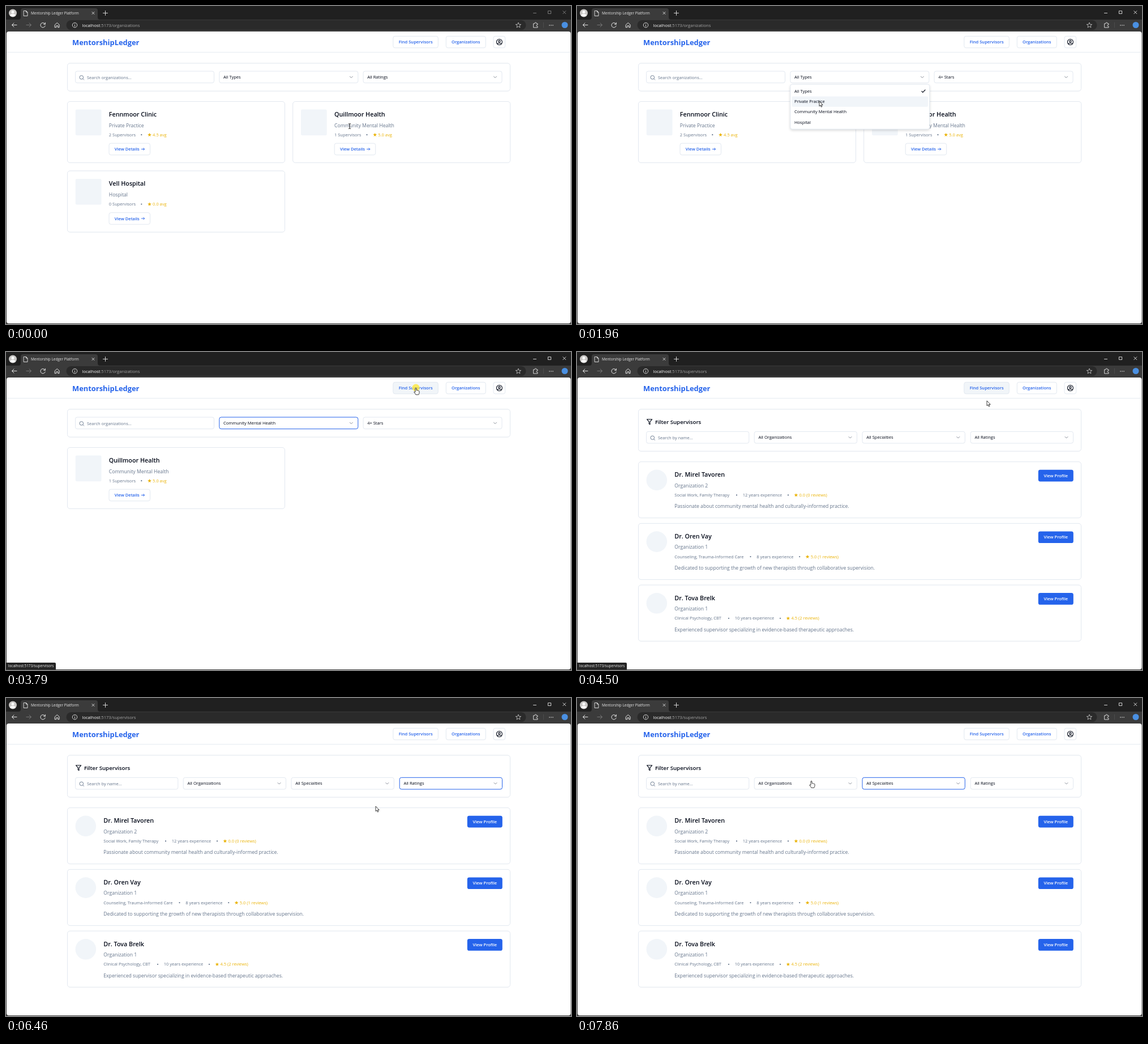
Recreate the animation shown at these times as an HTML page. Size 998 by 561 pixels, loop 8 s.

```html
<!DOCTYPE html>
<html lang="en">
<head>
<meta charset="utf-8">
<title>Mentorship Ledger Platform</title>
<style>
  html, body { margin: 0; width: 100%; height: 100%; overflow: hidden; background: #3b3b3b; }
  svg { display: block; width: 100vw; height: 100vh; }
  text { font-family: "Open Sans", "Noto Sans", sans-serif; white-space: pre; }
  .line { fill: none; stroke-linecap: round; stroke-linejoin: round; }
  .sm { font-size: 7.5px; }
  .base { font-size: 8.65px; }
  .head { font-size: 9.7px; font-weight: 600; }
  .title { font-size: 10.75px; font-weight: 600; }
  .btn { font-size: 7.5px; font-weight: 600; text-anchor: middle; }
  .brand { font-size: 12.9px; font-weight: 700; }
  .url { font-size: 7.6px; }
  .tiny { font-size: 6.45px; }
  .card { fill: #fff; stroke: #e2e8f0; filter: drop-shadow(0 .6px .6px #0000000d); }
  .menu { fill: #fff; stroke: #e2e8f0; filter: drop-shadow(0 2px 2px #00000024); }
</style>
</head>
<body>
<svg viewBox="0 0 998 561">
  <g id="chrome"></g>
  <g id="page"></g>
</svg>
<script>
const INK = '#020817', GREY = '#64748b', BLUE = '#2563eb', GOLD = '#eab308', PALE = '#f1f5f9', EDGE = '#e2e8f0';
const LOOP = 8000;

const text = (x, y, str, cls, fill = INK) => `<text x="${x}" y="${y}" class="${cls}" fill="${fill}">${str}</text>`;
const box = (x, y, w, h, r, attrs) => `<rect x="${x}" y="${y}" width="${w}" height="${h}" rx="${r}" ${attrs}/>`;
const line = (d, color, width = 1) => `<path class="line" d="${d}" stroke="${color}" stroke-width="${width}"/>`;
const ring = (x, y, r, color, width = 1) =>
  `<circle cx="${x}" cy="${y}" r="${r}" fill="none" stroke="${color}" stroke-width="${width}"/>`;
const dot = (x, y, r, fill) => `<circle cx="${x}" cy="${y}" r="${r}" fill="${fill}"/>`;

function star(x, y, r, attrs) {
  const pts = Array.from({ length: 10 }, (_, i) => {
    const a = -Math.PI / 2 + i * Math.PI / 5, q = i % 2 ? r * .42 : r;
    return `${(x + q * Math.cos(a)).toFixed(2)},${(y + q * Math.sin(a)).toFixed(2)}`;
  });
  return `<polygon points="${pts.join(' ')}" ${attrs}/>`;
}

/* ---- browser window ---- */
const light = '#e6e6e6';
document.getElementById('chrome').innerHTML =
  box(0, 0, 998, 561, 0, 'fill="#3b3b3b"') +
  box(0, 0, 998, 24, 0, 'fill="#202020"') +
  '<path d="M22 24Q26 24 26 20V8Q26 4 30 4H158Q162 4 162 8V20Q162 24 166 24Z" fill="#3b3b3b"/>' +
  dot(12, 12.5, 7, '#c9c7c5') + dot(12, 10.5, 2.6, '#fafafa') +
  '<path d="M7.3 17Q7.5 13.8 12 13.8T16.7 17Q12 20.5 7.3 17Z" fill="#fafafa"/>' +
  line('M31.5 8.5H35.5L38 11V17.5H31.5ZM35.5 8.5V11H38', light, .9) +
  text(44, 15.2, 'Mentorship Ledger Platform', 'tiny', light) +
  line('M152 10.5L156 14.5M156 10.5L152 14.5', light, .9) +
  line('M171.5 12.5H179.5M175.5 8.5V16.5', light, .9) +
  line('M19 33.5H10.5L14 30M10.5 33.5L14 37', light) +
  line('M36 33.5H44.5L41 30M44.5 33.5L41 37', '#777') +
  line('M69 32A4.2 4.2 0 1 0 69.2 35M69.3 29.3V32.2H66.4', light) +
  line('M86.5 33L90.3 29.6 94 33V37.7H91.7V34.8H88.9V37.7H86.5Z', light) +
  box(106.5, 25, 812, 17.5, 8.7, 'fill="#2a2a2a"') +
  ring(121.5, 33.7, 4.2, light, .9) + line('M121.5 33.5V35.8M121.5 31.6V31.7', light, .9) +
  star(905, 34, 5, 'fill="none" stroke="#b8b8b8" stroke-width=".9" stroke-linejoin="round"') +
  line('M932 31H934Q934 29 935.5 29T937 31H939V33Q937 33 937 34.5T939 36V38H932Z', light, .9) +
  line('M949.5 29V38', '#555', .7) +
  [960, 963, 966].map(x => dot(x, 34, .8, light)).join('') +
  dot(987, 33.5, 5.5, '#4a90e2');

/* ---- data ---- */
const types = ['All Types', 'Private Practice', 'Community Mental Health', 'Hospital'];
const ratings = ['2+ Stars', '3+ Stars', '4+ Stars', 'All Ratings'];
const specialties = ['All Specialties', 'Clinical Psychology', 'Counseling', 'Social Work'];

const clinics = [
  { name: 'Fennmoor Clinic', type: 1, count: 2, score: 4.5 },
  { name: 'Quillmoor Health', type: 2, count: 1, score: 5 },
  { name: 'Vell Hospital', type: 3, count: 0, score: 0 }
];
// b1 and b2 are the bullet positions in the detail row
const people = [
  { name: 'Dr. Mirel Tavoren', org: 2, spec: 'Social Work, Family Therapy', years: 12, score: 0, reviews: 0, b1: 282, b2: 373,
    bio: 'Passionate about community mental health and culturally-informed practice.' },
  { name: 'Dr. Oren Vay', org: 1, spec: 'Counseling, Trauma-Informed Care', years: 8, score: 5, reviews: 1, b1: 306.5, b2: 393.2,
    bio: 'Dedicated to supporting the growth of new therapists through collaborative supervision.' },
  { name: 'Dr. Tova Brelk', org: 1, spec: 'Clinical Psychology, CBT', years: 10, score: 4.5, reviews: 2, b1: 268, b2: 359,
    bio: 'Experienced supervisor specializing in evidence-based therapeutic approaches.' }
];

const pages = {
  org: { path: 'organizations', top: 115, searchW: 245, hint: 'Search organizations...', selects: [
    { id: 'type', x: 376.8, w: 245, opts: types },
    { id: 'rating', x: 631, w: 245, opts: ratings }] },
  sup: { path: 'supervisors', top: 140.3, searchW: 181.3, hint: 'Search by name...', selects: [
    { id: 'org', x: 313.2, w: 181.3, opts: ['All Organizations'] },
    { id: 'spec', x: 504, w: 181.3, opts: specialties },
    { id: 'rating', x: 695.2, w: 181.3, opts: ratings }] }
};

/* ---- timeline ---- */
const drop = id => ({ open: id, ring: '' });
const pick = (id, value) => ({ [id]: value, open: '', ring: id });
const events = [
  [0, { page: 'org', active: false, type: 0, rating: 3, org: 0, spec: 0, open: '', ring: '', hover: false }],
  [420, { active: true, ...drop('rating') }],
  [1120, pick('rating', 2)],
  [1540, drop('type')],
  [2240, pick('type', 1)],
  [2520, drop('type')],
  [2940, pick('type', 2)],
  [3650, { hover: true }],
  [3930, { page: 'sup', rating: 3, ring: '' }],
  [4640, { hover: false }],
  [4920, drop('rating')],
  [5480, pick('rating', 2)],
  [5620, drop('rating')],
  [6320, pick('rating', 3)],
  [6740, drop('spec')],
  [7020, pick('spec', 1)],
  [7300, drop('spec')],
  [7720, pick('spec', 0)]
];
const presses = [420, 980, 1540, 2100, 2520, 2800, 3790, 4920, 5340, 5620, 6180, 6740, 6880, 7300, 7580];

// time, x, y, pointer shape held until the next key
const moves = [
  [0, 607, 212, 'beam'], [140, 625, 194, 'arrow'], [280, 668, 146, 'arrow'], [420, 690, 126, 'arrow'],
  [980, 675, 187, 'arrow'], [1120, 675, 187, 'beam'], [1260, 610, 160, 'arrow'], [1400, 520, 130, 'hand'],
  [1540, 445, 126, 'arrow'], [1960, 428, 168, 'arrow'], [2240, 428, 168, 'arrow'], [2380, 428, 130, 'hand'],
  [2520, 427, 128, 'arrow'], [2800, 427, 191, 'arrow'], [2940, 427, 191, 'arrow'], [3650, 724, 63, 'hand'],
  [4070, 724, 63, 'hand'], [4500, 724, 86, 'arrow'], [4780, 729, 145, 'hand'], [4920, 730, 149, 'arrow'],
  [5340, 731, 211, 'arrow'], [5480, 731, 211, 'arrow'], [5620, 731, 152, 'arrow'], [5760, 731, 150, 'arrow'],
  [6180, 734, 230, 'arrow'], [6320, 734, 230, 'arrow'], [6600, 572, 152, 'hand'], [6740, 563, 152, 'arrow'],
  [6880, 561, 191, 'arrow'], [7020, 561, 191, 'arrow'], [7160, 556, 160, 'hand'], [7300, 552, 152, 'arrow'],
  [7580, 549, 175, 'arrow'], [7720, 549, 175, 'arrow'], [7860, 414, 146, 'hand']
];

function tick(t) {
  const [from, last] = t < 3230 ? [0, 2940] : t < 4500 ? [3230, 4070] : [4500, 7860];
  return Math.min(from + Math.floor((t - from) / 140) * 140, last);
}
const stateAt = t => Object.assign({}, ...events.filter(e => e[0] <= t).map(e => e[1]));
function pointerAt(t) {
  const i = moves.findLastIndex(m => m[0] <= t);
  const a = moves[i], b = moves[i + 1] || a;
  const k = b === a ? 0 : (t - a[0]) / (b[0] - a[0]);
  return { x: a[1] + (b[1] - a[1]) * k, y: a[2] + (b[2] - a[2]) * k, kind: a[3] };
}

/* ---- parts ---- */
const card = (x, y, w, h) => box(x, y, w, h, 4.5, 'class="card"');
const outlined = (x, y, w, h, fill = '#fff', stroke = EDGE) => box(x, y, w, h, 3.4, `fill="${fill}" stroke="${stroke}"`);
const bullet = (x, y) => dot(x, y - 2.6, 1.1, GREY);
const score = (x, y, str) => star(x + 3.4, y - 2.5, 3.5, `fill="${GOLD}"`) + text(x + 9, y, str, 'sm', GOLD);

function header(s) {
  return box(1, 45, 996.5, 515, 4, 'fill="#fff"') +
    line('M1.5 81.7H997', EDGE, .9) +
    text(117, 69.3, 'MentorshipLedger', 'brand', BLUE) +
    outlined(683.8, 53.3, 79.5, 20.5, s.hover ? PALE : '#fff') + text(723.7, 66.2, 'Find Supervisors', 'btn', BLUE) +
    outlined(777.3, 53.3, 70, 20.5) + text(812.2, 66.2, 'Organizations', 'btn', BLUE) +
    outlined(861, 53.3, 20.7, 20.5) +
    ring(871.4, 63.5, 5, INK, 1.1) + ring(871.4, 62.3, 1.7, INK, 1.1) +
    line('M868.2 67.2Q868.4 65.5 870 65.5H872.8Q874.4 65.5 874.6 67.2', INK, 1.1);
}

function filters(s) {
  const { top, searchW, hint, selects } = pages[s.page], mid = top + 10.4;
  let out = card(108.5, 101, 782, s.page === 'org' ? 49 : 74);
  if (s.page === 'sup')
    out += line('M123.5 118.7H132.7L129 123.2V127.8L127.2 126.8V123.2Z', INK, 1.1) + text(138, 127, 'Filter Supervisors', 'head');
  out += outlined(122.5, top, searchW, 20.7) + ring(133.3, mid + .5, 3.3, GREY, .9) +
    line(`M135.8 ${mid + 3}L137.6 ${mid + 4.8}`, GREY, .9) + text(143, mid + 3.3, hint, 'sm', GREY);
  for (const { id, x, w, opts } of selects) {
    out += outlined(x, top, w, 20.7, '#fff', s.ring === id ? BLUE : EDGE) +
      text(x + 7.2, mid + 2.7, opts[s[id]], 'sm') +
      line(`M${x + w - 14.5} ${mid - 1.2}l2.5 2.5 2.5 -2.5`, '#7b818d', .9);
  }
  return out;
}

function clinicCard(c, i) {
  const x = 108.5 + i % 2 * 398.2, y = 168.5 + Math.floor(i / 2) * 122.4, tx = x + 73.3;
  return card(x, y, 384, 108) +
    box(x + 14.3, y + 14, 45.7, 45.7, 2.3, `fill="${PALE}"`) +
    text(tx, y + 26.5, c.name, 'title') +
    text(tx, y + 45, types[c.type], 'base', GREY) +
    text(tx, y + 61.3, `${c.count} Supervisors`, 'sm', GREY) + bullet(tx + 57.5, y + 61.3) +
    score(tx + 68.3, y + 61.3, `${c.score.toFixed(1)} avg`) +
    outlined(tx + .2, y + 73.7, 72.5, 20.6) +
    text(tx + 32, y + 86.6, 'View Details', 'btn', BLUE) +
    line(`M${tx + 57.5} ${y + 84}h5.3m-2 -2l2 2l-2 2`, BLUE, .9);
}

function personCard(p, i) {
  const y = 193.7 + i * 108.7, row = y + 61.3;
  return card(108.5, y, 782, 99) + dot(140.8, y + 32.2, 18.3, PALE) +
    text(172.3, y + 26.6, p.name, 'title') +
    text(172.3, y + 45, `Organization ${p.org}`, 'base', GREY) +
    text(172.3, row, p.spec, 'sm', GREY) + bullet(p.b1, row) +
    text(p.b1 + 10.7, row, `${p.years} years experience`, 'sm', GREY) + bullet(p.b2, row) +
    score(p.b2 + 10.5, row, `${p.score.toFixed(1)} (${p.reviews} reviews)`) +
    text(172.3, y + 81.4, p.bio, 'base', GREY) +
    box(814.8, y + 14, 62, 20.7, 3.4, `fill="${BLUE}"`) + text(845.8, y + 27, 'View Profile', 'btn', '#fff');
}

function results(s) {
  const enough = r => s.rating === 3 || r.score >= s.rating + 2;
  return s.page === 'org'
    ? clinics.filter(c => enough(c) && (!s.type || c.type === s.type)).map(clinicCard).join('')
    : people.filter(p => enough(p) && (!s.spec || p.spec.includes(specialties[s.spec]))).map(personCard).join('');
}

function menu(s, ptr) {
  if (!s.open) return '';
  const { top, selects } = pages[s.page];
  const { x, w, opts } = selects.find(q => q.id === s.open);
  const y = top + 23.2, first = y + 2.9, step = 18.3;
  const under = Math.floor((ptr.y - first) / step);
  const lit = under >= 0 && under < opts.length ? under : s[s.open];
  return box(x, y, w + 1, opts.length * step + 5.8, 3.4, 'class="menu"') + opts.map((o, i) => {
    const iy = first + i * step;
    return (i === lit ? box(x + 2.7, iy, w - 4.4, step, 2, `fill="${PALE}"`) : '') +
      text(x + 7.2, iy + 11.7, o, 'sm') +
      (i === s[s.open] ? line(`M${x + w - 13} ${iy + 9.3}l2 2 4.2 -4.4`, INK, 1.1) : '');
  }).join('');
}

const shapes = {
  arrow: '<path d="M0 0V8.8L2 7L3.4 10.2L4.9 9.5L3.5 6.5H6.2Z" fill="#fff" stroke="#111" stroke-width=".8" stroke-linejoin="round"/>',
  beam: line('M-1.6 -4.5Q0 -4.5 0 -3.6Q0 -4.5 1.6 -4.5M0 -3.6V3.6M-1.6 4.5Q0 4.5 0 3.6Q0 4.5 1.6 4.5', '#111', .9),
  hand: '<path d="M-1 1Q0 -.6 1 1V4.6Q2.2 3.8 2.8 5Q4 4.3 4.5 5.5Q6 5 6 6.6V9Q5.6 10.8 4.8 12.3H-.2Q-1.2 10 -3.3 7.8Q-3.4 6.2 -1 7.8Z" ' +
    'fill="#fff" stroke="#111" stroke-width=".8" stroke-linejoin="round"/>'
};

function render(t) {
  const s = stateAt(t), ptr = pointerAt(t), path = pages[s.page].path;
  const win = s.active ? light : '#858585';
  return text(134.5, 36.5, `localhost<tspan fill="#a5a5a5">:5173/${path}</tspan>`, 'url', '#fff') +
    line('M931.5 12.5H936.5M957.8 8.7H962.6V13.5H957.8ZM983.8 8.7L988.8 13.7M988.8 8.7L983.8 13.7', win, .9) +
    header(s) + filters(s) + results(s) + menu(s, ptr) +
    (s.hover ? '<path d="M0 548H86Q88 548 88 550V560H0Z" fill="#242424"/>' +
      text(3.8, 556.4, 'localhost:5173/supervisors', 'tiny', '#f0f0f0') : '') +
    (presses.includes(t) ? dot(ptr.x, ptr.y, 6.5, '#ffe93bcc') : '') +
    `<g transform="translate(${ptr.x} ${ptr.y})">${shapes[ptr.kind]}</g>`;
}

const page = document.getElementById('page');
let shown = -1;
function frame() {
  const t = tick(performance.now() % LOOP);
  if (t !== shown) page.innerHTML = render(shown = t);
  requestAnimationFrame(frame);
}
frame();
</script>
</body>
</html>
```
